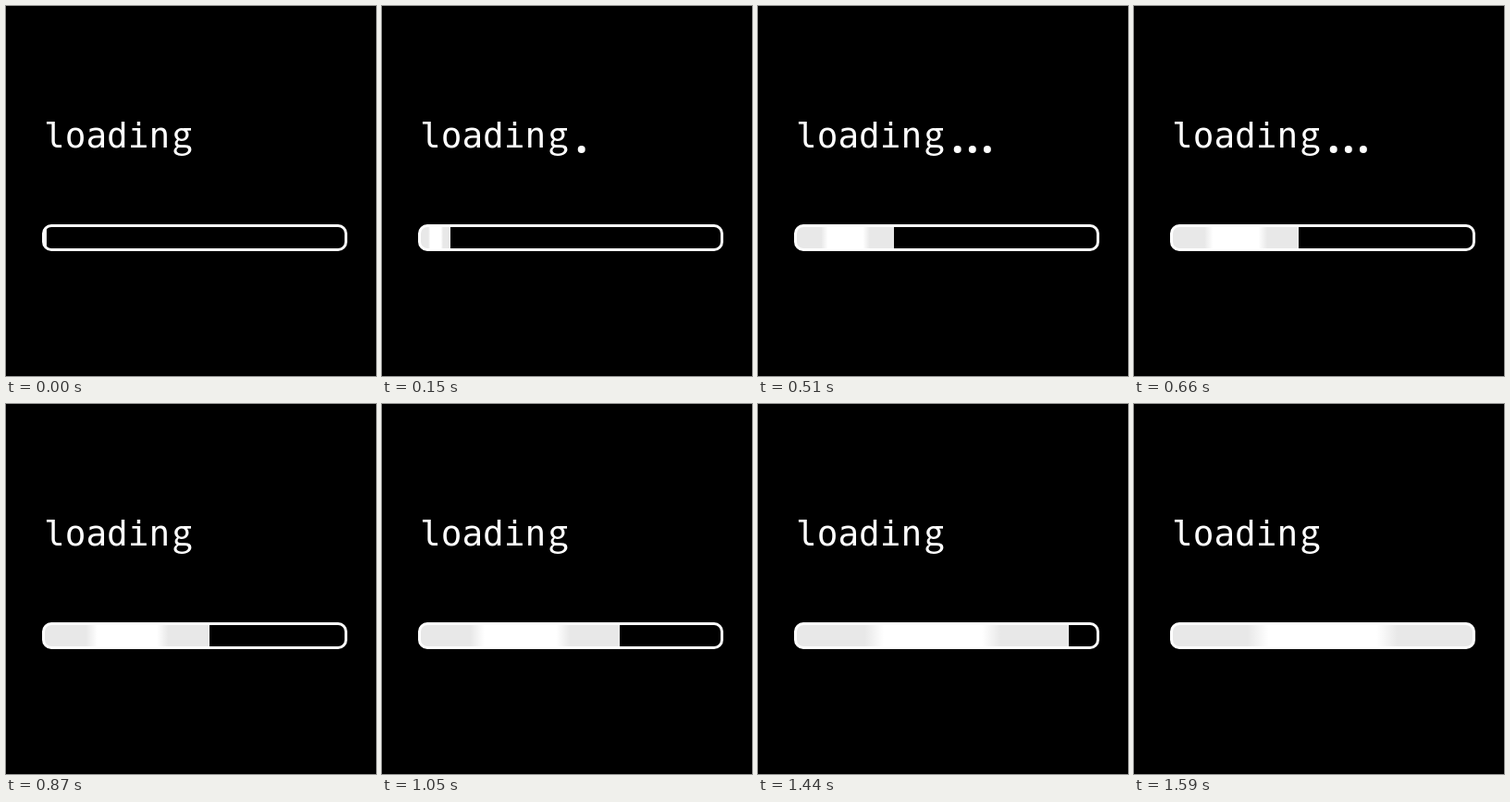
These frames come from a looping animation (400x400 px, 4820 ms). An HTML page:

```html
<!DOCTYPE html>
<html lang="en">
<head>
<meta charset="utf-8">
<title>loading</title>
<style>
  html, body { margin: 0; width: 100%; height: 100%; overflow: hidden; background: #000; }
  svg { position: absolute; left: 0; top: 0; }
  text { font: 37.7px "DejaVu Sans Mono", monospace; fill: #fff; }
  .g { font: 38px "Noto Sans CJK JP", "Noto Sans CJK SC", "Open Sans", sans-serif; }
  .bar { position: absolute; left: 39px; top: 236px; width: 330px; height: 29px; }
  .bar::after {
    content: ""; position: absolute; inset: 0;
    border: 3px solid #fff; border-radius: 10px;
  }
  .fill {
    position: absolute; left: 3px; top: 3px; height: 23px;
    background: linear-gradient(90deg, #e8e8e8 25%, #fff 32%, #fff 68%, #e8e8e8 75%);
    animation: grow 4820ms infinite;
  }
  circle { fill: #fff; opacity: 0; animation: 4820ms step-end infinite; }
  .d1 { animation-name: dot1; }
  .d2 { animation-name: dot2; }
  .d3 { animation-name: dot3; }
  @keyframes grow {
    0% { width: 2px; animation-timing-function: steps(53); }
    32.987%, 100% { width: 324px; }
  }
  @keyframes dot1 { 0% { opacity: 0 } 2.489% { opacity: 1 } 17.427%, 100% { opacity: 0 } }
  @keyframes dot2 { 0% { opacity: 0 } 4.979% { opacity: 1 } 17.427%, 100% { opacity: 0 } }
  @keyframes dot3 { 0% { opacity: 0 } 7.468% { opacity: 1 } 17.427%, 100% { opacity: 0 } }
</style>
</head>
<body>
<svg width="400" height="400" viewBox="0 0 400 400">
  <text x="41" y="152.5">loadin<tspan class="g" x="179.5">g</tspan></text>
  <circle class="d1" cx="215.7" cy="155" r="4"/>
  <circle class="d2" cx="231.8" cy="155" r="4"/>
  <circle class="d3" cx="247.9" cy="155" r="4"/>
</svg>
<div class="bar"><div class="fill"></div></div>
</body>
</html>
```
